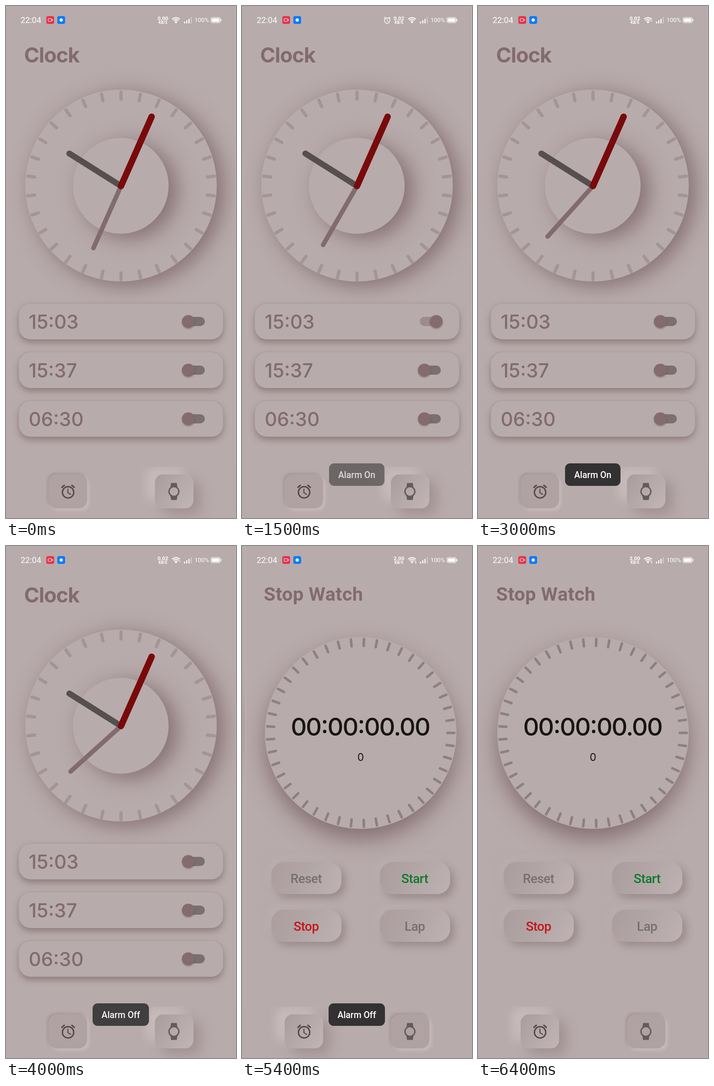
Animation of 502 by 1115 pixels, one loop 6.5 s. Source, as an HTML page:

```html
<!DOCTYPE html>
<html lang="en">
<head>
<meta charset="utf-8">
<title>Clock</title>
<style>
  :root { --bg: #b8abab; --ink: #826b6e; }
  html, body { margin: 0; width: 100%; height: 100%; overflow: hidden; background: var(--bg); }
  #stage { position: relative; width: 502px; height: 1115px; overflow: hidden; background: var(--bg); }
  #stage div, svg { position: absolute; }
  svg { left: 0; top: 0; overflow: hidden; }
  text { font-optical-sizing: none; font-feature-settings: "calt" 1; }
  .inter { font-family: Inter, sans-serif; }
  .roboto { font-family: Roboto, sans-serif; }
  #pager { width: 502px; height: 1003px; overflow: hidden; }
  #strip { width: 1004px; height: 1003px; }
  .page { top: 0; width: 502px; height: 1003px; overflow: hidden; background: var(--bg); }
  #edge { left: 501px; width: 1px; height: 1003px; background: #c5b9b9; }
  .disc { border-radius: 50%; background: var(--bg); }
  #dial { left: 42px; top: 182px; width: 418px; height: 418px;
    box-shadow: 14px 9px 46px rgba(112, 88, 91, .72); }
  #hub { left: 146px; top: 287px; width: 209px; height: 209px;
    box-shadow: 18px 10px 46px rgba(112, 88, 91, .72); }
  #watch { left: 42px; top: 198px; width: 418px; height: 418px;
    box-shadow: 0 22px 48px rgba(112, 88, 91, .72); }
  .card { left: 28px; width: 446px; height: 78px; border-radius: 26px; background: var(--bg);
    box-shadow: 0 7px 14px rgba(112, 88, 91, .55), 0 -1px 2px rgba(130, 110, 112, .18); }
  .btn { width: 153px; height: 70px; border-radius: 28px;
    background: linear-gradient(115deg, #ab9d9e, #b2a5a5 45%, #bfb2b2);
    box-shadow: 9px 9px 16px rgba(125, 105, 107, .45), -8px -8px 16px rgba(190, 178, 178, .5); }
  .track { left: 388px; width: 46px; height: 20px; border-radius: 10px; background: #7b6f70; }
  .thumb { left: 384px; width: 28px; height: 28px; border-radius: 50%; background: #846b6e;
    box-shadow: 0 2px 3px rgba(70, 55, 57, .4); }
  .on .track { background: #9f8b8d; }
  .on .thumb { left: 410px; }
  #nav { top: 1003px; width: 502px; height: 112px; overflow: hidden; background: var(--bg); }
  .tab { top: 17px; width: 84px; height: 74px; border-radius: 18px;
    background: linear-gradient(125deg, #a99c9c, #b5a8a8 45%, #c2b5b5);
    box-shadow: 16px 14px 26px rgba(135, 116, 118, .45), -18px -14px 22px rgba(206, 195, 195, .75); }
  .tab.in { background: #b0a2a2;
    box-shadow: 5px 5px 7px rgba(200, 189, 189, .85), -3px -3px 5px rgba(150, 134, 136, .55); }
  #toast { top: 996px; height: 49px; border-radius: 11px; background: #333132; color: #fff;
    font: 500 19.4px/51px Roboto, sans-serif; text-align: center; white-space: nowrap; }
</style>
</head>
<body>
<div id="stage">
  <div id="pager"><div id="strip">
    <div class="page" id="clockPage" style="left:0">
      <div id="dial" class="disc"></div>
      <div id="hub" class="disc"></div>
    </div>
    <div class="page" id="stopPage" style="left:502px">
      <div id="watch" class="disc"></div>
    </div>
    <div id="edge"></div>
  </div></div>
  <div id="nav">
    <div class="tab" id="alarmTab" style="left:93px"></div>
    <div class="tab" id="watchTab" style="left:325px"></div>
  </div>
  <svg id="top" width="502" height="1115"></svg>
  <div id="toast"></div>
</div>
<script>
const LOOP = 6500, STEP = 100;
const $ = id => document.getElementById(id);

function div(parent, cls, style = {}) {
  const el = document.createElement('div');
  el.className = cls;
  Object.assign(el.style, style);
  parent.append(el);
  return el;
}

function svg(parent, tag, attrs = {}, content = '') {
  const el = document.createElementNS('http://www.w3.org/2000/svg', tag);
  for (const k in attrs) el.setAttribute(k, attrs[k]);
  el.textContent = content;
  parent.append(el);
  return el;
}

const text = (parent, str, x, y, size, weight, fill, font, extra = {}) =>
  svg(parent, 'text', { x, y, fill, class: font, 'font-size': size, 'font-weight': weight, ...extra }, str);

// A stroke along a ray from (cx, cy); angle is clockwise from twelve o'clock.
const ray = (parent, cx, cy, r0, r1, angle, width, stroke) =>
  svg(parent, 'line', {
    x1: cx, x2: cx, y1: cy - r0, y2: cy - r1, stroke,
    'stroke-width': width, 'stroke-linecap': 'round',
    transform: `rotate(${angle} ${cx} ${cy})`
  });

const INK = '#826b6e';

// Clock page
const clockPage = $('clockPage');
const rows = ['15:03', '15:37', '06:30'].map((label, i) => {
  const y = 648 + 106 * i;
  div(clockPage, 'card', { top: y + 'px' });
  const sw = div(clockPage, 'switch');
  div(sw, 'track', { top: y + 29 + 'px' });
  div(sw, 'thumb', { top: y + 25 + 'px' });
  return { label, y, sw };
});
const face = svg(clockPage, 'svg', { width: 502, height: 1003 });
text(face, 'Clock', 39.5, 123, 45, 700, INK, 'inter', { 'letter-spacing': -1 });
for (const { label, y } of rows) text(face, label, 49.5, y + 55, 42, 500, INK, 'inter');
for (let i = 0; i < 30; i++) ray(face, 251, 392, 189.5, 204.5, i * 12, 7, '#a49595');
const second = ray(face, 251, 392, 0, 148, 204, 10, INK);
ray(face, 251, 392, 0, 133, -57.9, 13, '#574e4e');
ray(face, 251, 392, 0, 165, 23.9, 14, '#780a0c');

// Stopwatch page
const stopPage = $('stopPage');
const buttons = [
  ['Reset', 56, 688, '#777072'], ['Start', 293, 688, '#0d7a2c'],
  ['Stop', 56, 792, '#c4161c'], ['Lap', 293, 792, '#777072']
];
for (const [, x, y] of buttons) div(stopPage, 'btn', { left: x + 'px', top: y + 'px' });
const stop = svg(stopPage, 'svg', { width: 502, height: 1003 });
const mid = { 'text-anchor': 'middle' };
text(stop, 'Stop Watch', 39.5, 119, 41.5, 700, INK, 'roboto', { 'letter-spacing': 0.4 });
for (let i = 0; i < 45; i++) ray(stop, 251, 407, 189.5, 204.5, 90 + i * 8, 5.5, '#8e8080');
text(stop, '00:00:00.00', 250, 413, 54, 500, '#171414', 'inter', { ...mid, 'letter-spacing': -2 });
text(stop, '0', 251, 468, 23, 400, '#171414', 'inter', mid);
for (const [label, x, y, fill] of buttons)
  text(stop, label, x + 76, y + 45.5, 28, 500, fill, 'roboto', { ...mid, 'letter-spacing': -0.6 });

// Icons and status bar
const top_ = $('top');
const ALARM = 'M22 5.72l-4.6-3.86-1.29 1.53 4.6 3.86zM7.88 3.39L6.6 1.86 2 5.71l1.29 1.53zM12.5 8H11v6l4.75 2.85.75-1.23-4-2.37zM12 4a9 9 0 1 0 0 18 9 9 0 0 0 0-18zm0 16a7 7 0 1 1 0-14 7 7 0 0 1 0 14z';
const WATCH = 'M20 12c0-2.54-1.19-4.81-3.04-6.27L16 0H8l-.95 5.73C5.19 7.19 4 9.45 4 12s1.19 4.81 3.05 6.27L8 24h8l.96-5.73C18.81 16.81 20 14.54 20 12zM6 12a6 6 0 1 1 12 0 6 6 0 0 1-12 0z';
const icon = (d, x, y, size, fill) => svg(top_, 'path', {
  d, fill, 'fill-rule': 'evenodd',
  transform: `translate(${x} ${y}) scale(${size / 24}) translate(-12 -12)`
});
const rect = (x, y, width, height, rx, fill, extra = {}) =>
  svg(top_, 'rect', { x, y, width, height, rx, fill, ...extra });
const path = (d, extra = {}) => svg(top_, 'path', { d, fill: '#fff', ...extra });

icon(ALARM, 135.5, 1057.5, 37, '#544949');
icon(WATCH, 366.5, 1057.3, 37, '#665b5c');

text(top_, '22:04', 32, 37, 18, 400, '#fff', 'roboto');
rect(88, 22, 17, 17, 4, '#e4344c');
rect(92, 27.5, 7.5, 6, 1, 'none', { stroke: '#fff', 'stroke-width': 1 });
path('M99.5 30.5l2.5-2v4z');
rect(112, 22, 17, 17, 4, '#077bff');
svg(top_, 'circle', { cx: 120.5, cy: 30.5, r: 3.6, fill: '#fff' });
const statusAlarm = icon(ALARM, 317, 31, 18, '#fff');
const speed = text(top_, '0.00', 342.5, 31, 11.5, 700, '#fff', 'roboto', mid);
text(top_, 'KB/S', 342.5, 39, 8.3, 700, '#fff', 'roboto', mid);
for (const [r, o] of [[4.5, 1], [8.2, 1], [11.8, 1]]) {
  const k = r * 0.7;
  path(`M${371 - k} ${37 - k}A${r} ${r} 0 0 1 ${371 + k} ${37 - k}`,
    { fill: 'none', stroke: '#fff', 'stroke-width': 2, opacity: o });
}
path('M371 38l-2.4-2.6a3.4 3.4 0 0 1 4.8 0z');
const up = path('M376.8 34l2-2.6 2 2.6z');
const down = path('M376.8 35.6l2 2.6 2-2.6z');
[4, 7, 10, 14].forEach((h, i) =>
  rect(388.5 + i * 4.9, 38 - h, 2.4, h, 0.8, '#fff', { opacity: i < 3 ? 1 : 0.35 }));
text(top_, '100%', 411.5, 35.3, 13, 400, '#fff', 'roboto');
rect(447.5, 25, 20, 11.5, 3.5, 'none', { stroke: '#fff', 'stroke-width': 1.2 });
rect(449.3, 26.8, 16.4, 7.9, 2, '#fff');
rect(468.6, 28.5, 1.6, 4.5, 0.8, '#fff');

const toast = $('toast'), strip = $('strip');
const clamp = v => Math.min(1, Math.max(0, v));
const easeOut = x => 1 - (1 - clamp(x)) ** 2;

// Last value whose start time has passed
const at = (table, t) => table.filter(([start]) => start <= t).pop()[1];
const SECONDS = [[0, 34], [900, 35], [1900, 36], [2900, 37], [3900, 38]];
const SPEED = [[0, '0.00'], [1000, '0.02'], [5100, '2.00']];
const SLIDE = [[0, 502], [5400, 8], [5500, 4], [5600, 2], [5700, 1], [5800, 0]];

function toastAlpha(t) {
  if (t < 3700) return easeOut((t - 1300) / 600);
  if (t < 5400) return easeOut((t - 3600) / 600);
  return 1 - clamp((t - 5400) / 800) ** 3;
}

function render(now) {
  const t = Math.floor((now % LOOP) / STEP) * STEP;
  const isStop = t >= 5400, off = t >= 3700;

  strip.style.transform = `translateX(${at(SLIDE, t) - 502}px)`;
  second.setAttribute('transform', `rotate(${at(SECONDS, t) * 6} 251 392)`);
  rows[0].sw.classList.toggle('on', t >= 1300 && t < 2900);
  $('alarmTab').classList.toggle('in', !isStop);
  $('watchTab').classList.toggle('in', isStop);

  speed.textContent = at(SPEED, t);
  statusAlarm.style.opacity = t >= 1400 && t < 3000 ? 1 : 0;
  up.style.opacity = t >= 2900 ? 1 : 0;
  down.style.opacity = isStop ? 1 : 0;

  toast.textContent = off ? 'Alarm Off' : 'Alarm On';
  toast.style.left = (off ? 189 : 190) + 'px';
  toast.style.width = (off ? 123 : 121) + 'px';
  toast.style.opacity = toastAlpha(t);
}

const begin = performance.now();
function tick() {
  render(performance.now() - begin);
  requestAnimationFrame(tick);
}
tick();
</script>
</body>
</html>
```
